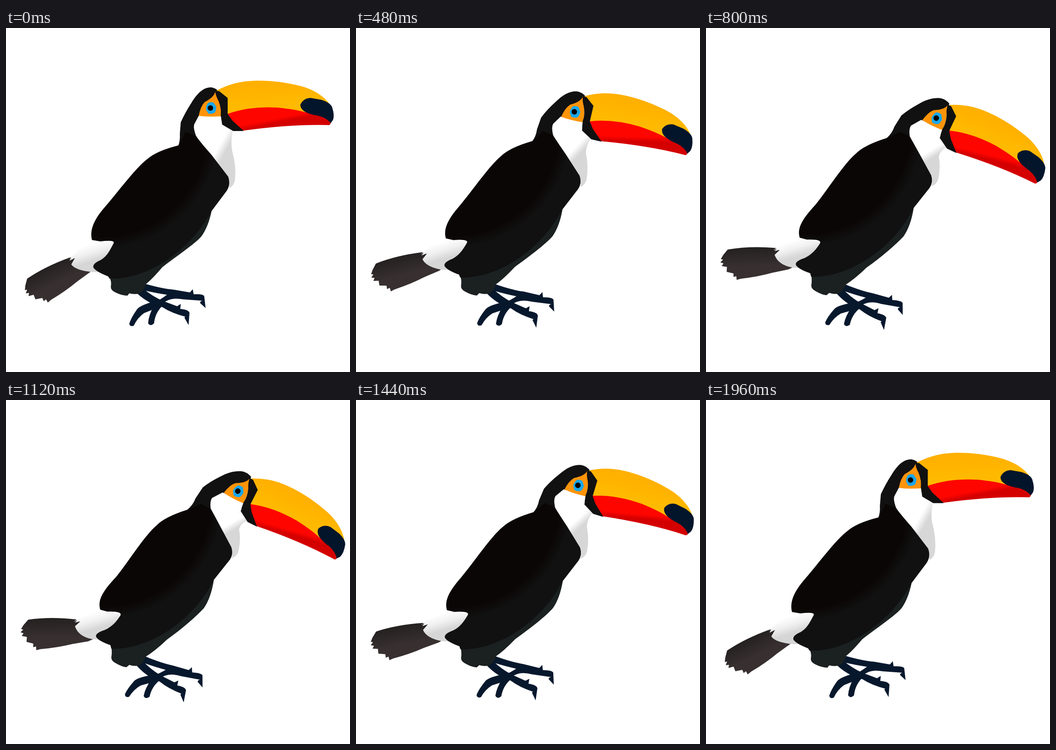
An HTML page with a canvas for the animation above (2000 ms loop, 748 by 748 pixels).

```html
<!DOCTYPE html>
<html lang="en">
<head>
<meta charset="utf-8">
<title>Toucan</title>
<style>
html, body { margin: 0; width: 100%; height: 100%; overflow: hidden; background: #fff; }
canvas { display: block; }
</style>
</head>
<body>
<canvas id="stage" width="748" height="748"></canvas>
<script>
const ctx = document.getElementById('stage').getContext('2d');
const LOOP = 2000, STEP = 40;
let k = 0; // 0 = upright, 1 = bowed

const pairs = s => s.match(/[\d.]+ [\d.]+/g).map(p => p.split(' ').map(Number));

// Blend two poses; each point follows a shallow clockwise arc.
function morph(a, b) {
  const to = pairs(b);
  let i = 0;
  return a.replace(/([\d.]+) ([\d.]+)/g, (_, x, y) => {
    const [bx, by] = to[i++], dx = bx - x, dy = by - y, bulge = 0.236 * k * (1 - k);
    return `${+x + k * dx + bulge * dy} ${+y + k * dy - bulge * dx}`;
  });
}

function fill(path, paint) {
  ctx.fillStyle = paint;
  ctx.fill(new Path2D(path));
}

function stops(gradient, colors) {
  colors.forEach((c, i) => gradient.addColorStop(i / (colors.length - 1), c));
  return gradient;
}

function fade(line, ...colors) {
  const [from, to] = pairs(line);
  return stops(ctx.createLinearGradient(...from, ...to), colors);
}

function glow(x, y, inner, outer, ...colors) {
  return stops(ctx.createRadialGradient(x, y, inner, x, y, outer), colors);
}

function turned(x, y, degrees, draw) {
  ctx.save();
  ctx.translate(x, y);
  ctx.rotate(degrees * k * Math.PI / 180);
  ctx.translate(-x, -y);
  draw();
  ctx.restore();
}

function feet() {
  const navy = '#07182d';
  fill('M302 556Q340 567 365 569L400 575L406 568L408 579Q428 578 431 583L434 609L422 598Q422 594 427 593L385 590Q365 586 352 592L325 606L318 600Q340 588 350 580Q328 577 298 570Z', navy);
  fill('M285 577L300 568Q318 583 340 593L372 605L380 600L379 611Q396 612 399 619L397 646L388 630Q389 627 391 628Q360 620 340 607Q310 600 285 577Z', navy);
  fill('M335 591Q290 602 284 613Q272 630 268 643Q270 651 278 647Q286 630 300 620L335 606Z', navy);
  fill('M322 603Q310 625 309 642Q314 650 322 642Q324 620 340 604Z', navy);
}

function tail() {
  fill('M139 499Q86 518 46 545L42 560L41 570L46 569L43 577L50 576L49 583L60 580L64 590L79 587L82 594L87 590L91 597L98 591Q130 572 155 551L184 530L196 516L160 500Z',
    fade('88 516 108 556', '#231f1f', '#372f30'));
}

function rump() {
  fill(morph('M136 503L142 498L138 506L150 500L142 514Q150 527 190 531L215 530L235 466L187 460Q165 475 136 503Z',
    'M147 482L155 479L150 484L162 481L150 492Q157 514 187 520L215 522L249 466L204 456Q178 460 147 482Z'),
    fade(morph('175 472 186 508', '187 463 197 497'), '#fff', '#f0f0f0', '#d6d6d6'));
}

function torso() {
  // belly
  fill(morph('M225 541Q230 552 228 562Q227 570 238 575Q252 582 264 582L268 577Q282 580 290 577Q302 571 304 557Q318 546 340 520C375 493 410 470 425 453Q440 432 447 398L400 430L300 500Z',
    'M229 535Q231 548 229 560Q229 568 240 573Q252 580 262 581L268 576Q280 580 290 577Q300 570 304 558Q325 545 350 521C382 498 410 474 430 453Q446 430 452 391L405 425L305 495Z'), '#1b2020');
  // neck and crown
  fill(morph('M374 257Q379 247 378 230L380 205Q390 183 403 163C417 140 430 129 446 129C453 130 458 133 463 138L470 200L447 278L415 290Z',
    'M394 239Q407 228 412 214L428 190Q443 178 465 167C484 157 498 154 512 155C521 156 528 161 533 167L515 233L466 276L440 290Z'), '#111');
  // throat
  fill(morph('M419 191L410 208Q406 215 413 234L447 290L484 340L486 348Q496 342 498 330Q501 300 492 268Q488 250 493 223L470 208L467 189Z',
    'M471 201L448 213Q443 220 445 236L462 290L492 340L491 344Q503 340 506 327Q511 300 507 282Q508 270 524 263L510 241L517 222Z'),
    fade(morph('467 250 483 259', '490 267 498 281'), '#fff', '#d7d7d7'));
  // back and wing
  fill(morph('M376 255Q327 267 306 286C281 305 240 361 211 394C186 424 183 444 187 461L205 464Q238 460 234 468C224 487 219 497 205 505Q188 512 190 521Q196 530 222 540L225 545C305 548 398 488 447 398L480 354Q489 340 483 323L447 276Q429 256 412 234L390 226Z',
    'M396 238Q345 254 327 273C301 295 266 352 240 384C205 421 200 438 205 456L220 460Q253 459 249 468C240 482 232 492 215 500Q193 507 196 515Q201 524 227 533L229 541C312 543 408 480 452 391L487 347Q495 335 490 320L466 275Q455 254 445 236L424 226Z'),
    glow(205 + 7 * k, 220 - 6 * k, 234, 260, '#0a0605', '#111'));
}

function beak() {
  fill('M458 136Q475 127 492 122C530 110 590 113 640 126C675 135 700 155 707 172L700 190L600 185L474 187L470 152Z',
    fade('560 125 562 165', '#ffb000', '#ffb900'));
  fill('M474 187L484 186Q530 170 590 173Q630 177 650 183L690 185L706 207Q705 212 699 211Q620 209 517 223L480 212Z',
    fade('590 196 592 206', '#ff0500', '#d40000'));
  fill('M640 167Q646 153 662 152L685 156Q705 162 709 172Q715 190 711 200L706 207Q698 196 680 191Q640 185 640 167Z', '#03152b');
}

function head() {
  // the beak foreshortens slightly as it dips
  const squeeze = 1 - 0.015 * k;
  ctx.save();
  ctx.translate(482 * (1 - squeeze), 0);
  ctx.scale(squeeze, 1);
  beak();
  ctx.restore();
  fill('M455 138Q456 147 462 158Q469 175 467 192Q440 194 419 191Q423 170 432 161Q453 150 455 138Z', '#ff9409');
  fill('M455 137L463 137L482 152L482 187L492 201L517 224L494 224L470 210L467 190Q469 175 462 158Q456 147 455 137Z', '#111');
  fill('M439 163Q445 160 451 162L457 171Q458 177 454 184Q447 188 440 186L435 178Q434 170 439 163Z', '#1aa7ec');
  ctx.beginPath();
  ctx.arc(444.5, 174, 6, 0, 7);
  ctx.fillStyle = '#000';
  ctx.fill();
}

function frame(now) {
  const t = Math.floor(now % LOOP / STEP) * STEP;
  k = 0.518 * (1 - Math.cos(2 * Math.PI * t / LOOP));
  ctx.clearRect(0, 0, 748, 748);
  turned(290, 558, 6.5, feet);
  turned(193, 516, 26, tail);
  rump();
  torso();
  turned(424, 310, 27, head);
}

const start = performance.now();
function tick() {
  frame(performance.now() - start);
  requestAnimationFrame(tick);
}
tick();
</script>
</body>
</html>
```
